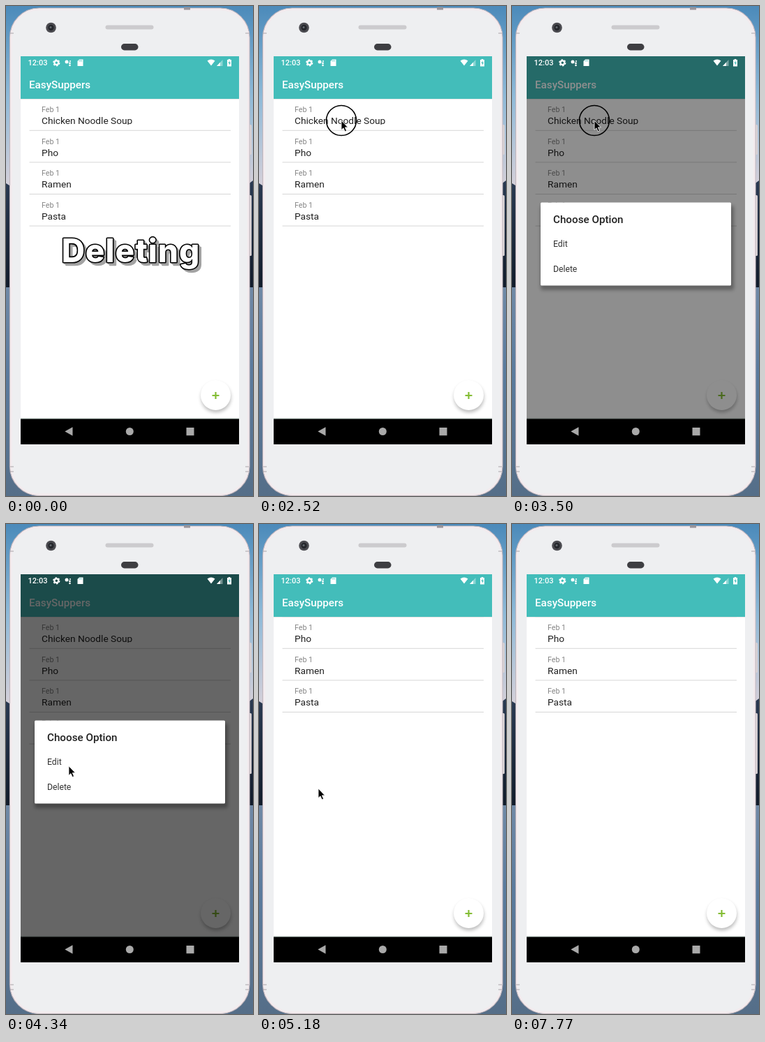
Animation of 354 by 702 pixels, one loop 7.84 s. Source, as an HTML page:

```html
<!DOCTYPE html>
<html lang="en">
<head>
<meta charset="utf-8">
<title>Deleting a list entry</title>
<style>
  html, body { margin: 0; width: 100%; height: 100%; overflow: hidden; background: #5b7896; }
  svg { display: block; width: 354px; height: 702px; font-family: Roboto, "Open Sans", sans-serif; }
  .bold { font-weight: 500; font-size: 15.2px; }
  .date { font-size: 10.66px; fill: #858585; }
  .name { font-size: 13.7px; fill: #212121; }
  .option { font-size: 12.2px; fill: #333; }
  .caption {
    font: 800 46px Inter, sans-serif;
    letter-spacing: 1px; text-anchor: middle; stroke-linejoin: round;
  }
</style>
</head>
<body>
<svg viewBox="0 0 354 702">
  <defs>
    <linearGradient id="sky" x2="0" y2="1">
      <stop offset="0" stop-color="#4b8aba"/>
      <stop offset=".5" stop-color="#8fbad8"/>
      <stop offset="1" stop-color="#d6d0d9"/>
    </linearGradient>
    <linearGradient id="hills" x2="0" y2="1">
      <stop offset="0" stop-color="#2a3a52"/>
      <stop offset="1" stop-color="#111b2a"/>
    </linearGradient>
    <linearGradient id="water" x2="0" y2="1">
      <stop offset="0" stop-color="#7089a6"/>
      <stop offset=".4" stop-color="#5b7b9e"/>
      <stop offset="1" stop-color="#556e88"/>
    </linearGradient>
    <filter id="soft" x="-30%" y="-30%" width="160%" height="160%">
      <feGaussianBlur stdDeviation="2.5"/>
    </filter>
    <clipPath id="firstRow"><rect x="21" y="133" width="313" height="45"/></clipPath>
    <clipPath id="deleteRow"><rect x="41" y="358.5" width="273" height="36"/></clipPath>
    <clipPath id="rowText"><rect x="40" y="0" width="290" height="37"/></clipPath>
  </defs>

  <!-- backdrop -->
  <rect width="354" height="260" fill="url(#sky)"/>
  <path d="M0 254L8 259H342L354 250V404H0Z" fill="url(#hills)"/>
  <rect y="403" width="354" height="299" fill="url(#water)"/>

  <!-- phone -->
  <g fill="#d9d3d6">
    <rect x="347" y="170" width="5" height="43" rx="1.5"/>
    <rect x="347" y="271" width="5" height="87" rx="1.5"/>
  </g>
  <rect x="5.5" y="3" width="343.5" height="698.5" rx="42" fill="#eeeff1" stroke="#c3b7bd" stroke-width="1.2"/>
  <rect x="7.5" y="5" width="339.5" height="694.5" rx="40" fill="none" stroke="#f3ebee" stroke-width="2.5"/>
  <path d="M6 660h5M6 667h5M343 660h5M343 667h5M6 39h5M343 39h5" stroke="#aaa5aa"/>
  <rect x="255" y="1.5" width="9" height="4" fill="#99959b"/>
  <circle cx="64.5" cy="31" r="7.3" fill="#4b4b50"/>
  <circle cx="64.5" cy="31" r="4.2" fill="#25272c"/>
  <circle cx="64" cy="30.5" r="1.5" fill="#62686f"/>
  <rect x="142.5" y="27.5" width="69" height="6" rx="3" fill="#cccbce"/>
  <rect x="165" y="54" width="24.5" height="9.5" rx="4.7" fill="#3e3e42"/>

  <!-- app -->
  <rect x="21" y="72" width="313" height="520" fill="#fff"/>
  <g clip-path="url(#firstRow)">
    <circle id="press" cx="178" cy="160" fill="#e0e0e0"/>
  </g>
  <g id="list"></g>
  <rect x="21" y="133" width="313" height="1" fill="#000" opacity=".08"/>
  <rect x="21" y="72" width="313" height="61" fill="#43bdba"/>
  <text class="bold" x="33" y="117.5" fill="#fff">EasySuppers</text>
  <circle cx="301" cy="561" r="21.5" opacity=".25" filter="url(#soft)"/>
  <circle cx="300.5" cy="557.5" r="21.5" fill="#fff"/>
  <path d="M295.5 558h10M300.5 553v10" stroke="#84bd35" stroke-width="2.2"/>
  <rect x="21" y="590.5" width="313" height="1" fill="#7fa894" opacity=".5"/>
  <rect id="dim" x="21" y="72" width="313" height="520"/>

  <!-- system bars -->
  <g fill="#fff">
    <text x="31.500" y="85" font-size="11" font-weight="500">12:03</text>
    <circle cx="72.3" cy="81.3" r="2.9" fill="none" stroke="#fff" stroke-width="2.2"/>
    <circle cx="72.3" cy="81.3" r="4.4" fill="none" stroke="#fff" stroke-width="1.5" stroke-dasharray="2.3 2.31"/>
    <circle cx="87" cy="80" r="2.5"/>
    <circle cx="92" cy="79" r="1"/>
    <circle cx="91.5" cy="82" r="1.4"/>
    <circle cx="91.5" cy="85" r="1.3"/>
    <path d="M105 76.5h5.500v9.500h-8v-7z"/>
    <path d="M288.5 78.5q5.500-4 11 0l-5.500 7z"/>
    <path d="M302 86l8.500-9v9z" opacity=".4"/>
    <path d="M302 86l5-5.300V86z"/>
    <path d="M318.7 76h2.600v1h1.700v9.500h-6V77h1.700z"/>
  </g>
  <path d="M105 77.5v2M106.7 77.5v2M108.4 77.5v2" stroke="#43bdba" stroke-width=".7"/>
  <path d="M320.5 78.3l-2 3.700h1.500v2.800l2-3.800h-1.500z" fill="#43bdba"/>
  <rect x="21" y="591.5" width="313" height="36.5"/>
  <g fill="#a9a9a9">
    <path d="M84.300 609.5l11.200-6.300v12.600z"/>
    <circle cx="177.3" cy="609.5" r="5.5"/>
    <rect x="258.5" y="604" width="11" height="11.3"/>
  </g>

  <g id="dialog">
    <rect x="41" y="286" width="277" height="121" rx="3" opacity=".3" filter="url(#soft)"/>
    <rect x="41" y="281.5" width="273" height="119" rx="1.5" fill="#fff"/>
    <g clip-path="url(#deleteRow)">
      <circle id="ripple" cx="178" cy="376.5" opacity=".12"/>
    </g>
    <text class="bold" x="59" y="311" fill="#212121">Choose Option</text>
    <text class="option" x="59" y="344.5">Edit</text>
    <text class="option" x="59" y="381">Delete</text>
  </g>

  <g id="caption" class="caption">
    <g fill="#a3a3a3" stroke="#a3a3a3" stroke-width="2.5">
      <text x="181" y="369">Deleting</text>
      <text x="183" y="371">Deleting</text>
    </g>
    <text x="179" y="367" fill="#fff" stroke="#000" stroke-width="3.2" paint-order="stroke">Deleting</text>
  </g>

  <g id="pointer">
    <circle id="ring" r="21.5" fill="none" stroke="#000" stroke-width="1.6"/>
    <path d="M0 0V13.500L3 10.800L5.200 15.800L7.500 14.800L5.300 9.900H9.400Z" stroke="#fff" stroke-width=".8"/>
  </g>
</svg>
<script>
const LOOP = 7840, ROW = 45.6;
const el = id => document.getElementById(id);
const show = (id, on) => el(id).setAttribute("visibility", on ? "visible" : "hidden");
const set = (id, name, value) => el(id).setAttribute(name, value);

// Linear interpolation through [time, value] pairs
function track(t, keys) {
  const i = keys.findIndex(k => k[0] > t);
  if (i < 0) return keys[keys.length - 1][1];
  if (i === 0) return keys[0][1];
  const [t0, a] = keys[i - 1], [t1, b] = keys[i];
  return a + (b - a) * (t - t0) / (t1 - t0);
}

const ease = p => p * p * (3 - 2 * p);

// Pointer stops: [arrive, leave, x, y]
const stops = [
  [1050, 1050, 240, 330], [1300, 1500, 110, 162], [1900, 3850, 118, 164],
  [4500, 6400, 85, 379], [6860, 6860, 210, 725]
];
function pointerAt(t) {
  const i = Math.max(0, stops.findLastIndex(s => s[0] <= t));
  const [, leave, x, y] = stops[i], next = stops[i + 1];
  if (!next || t <= leave) return [x, y];
  const p = ease((t - leave) / (next[0] - leave));
  return [x + (next[2] - x) * p, y + (next[3] - y) * p];
}

el("list").innerHTML = ["Chicken Noodle Soup", "Pho", "Ramen", "Pasta"].map((name, i) => `
  <g transform="translate(0 ${133 + i * ROW})">
    <g clip-path="url(#rowText)">
      <text class="date" x="51" y="19">Feb 1</text>
      <text class="name" x="51" y="36.3">${name}</text>
    </g>
    <path d="M33.5 45.3H322" stroke="#d6d6d6"/>
  </g>`).join("");

function draw(t) {
  show("caption", t < 980);
  show("pointer", t >= 1050 && t < 6860);
  show("ring", t >= 1050 && t < 3700);
  set("pointer", "transform", `translate(${pointerAt(t)})`);

  set("press", "r", track(t, [[2900, 0], [3180, 162]]));
  set("press", "opacity", track(t, [[3400, 1], [3490, 0]]));
  set("list", "transform", `translate(0 ${t < 5150 ? 0 : -ROW})`);

  set("dim", "opacity", track(t, [[3400, 0], [3500, .44], [3570, .56], [3640, .6], [4970, .6], [5040, .41], [5180, 0]]));
  set("dialog", "opacity", track(t, [[3400, 0], [3490, 1], [4970, 1], [5040, .61], [5140, 0]]));
  const size = track(t, [[3400, .92], [3490, 1]]);
  set("dialog", "transform", `translate(177.5 341) scale(${size}) translate(-177.5 -341)`);
  set("ripple", "r", track(t, [[4860, 0], [5040, 100], [5120, 140]]));
}

const start = performance.now();
function tick() {
  draw((performance.now() - start) % LOOP);
  requestAnimationFrame(tick);
}
tick();
</script>
</body>
</html>
```
